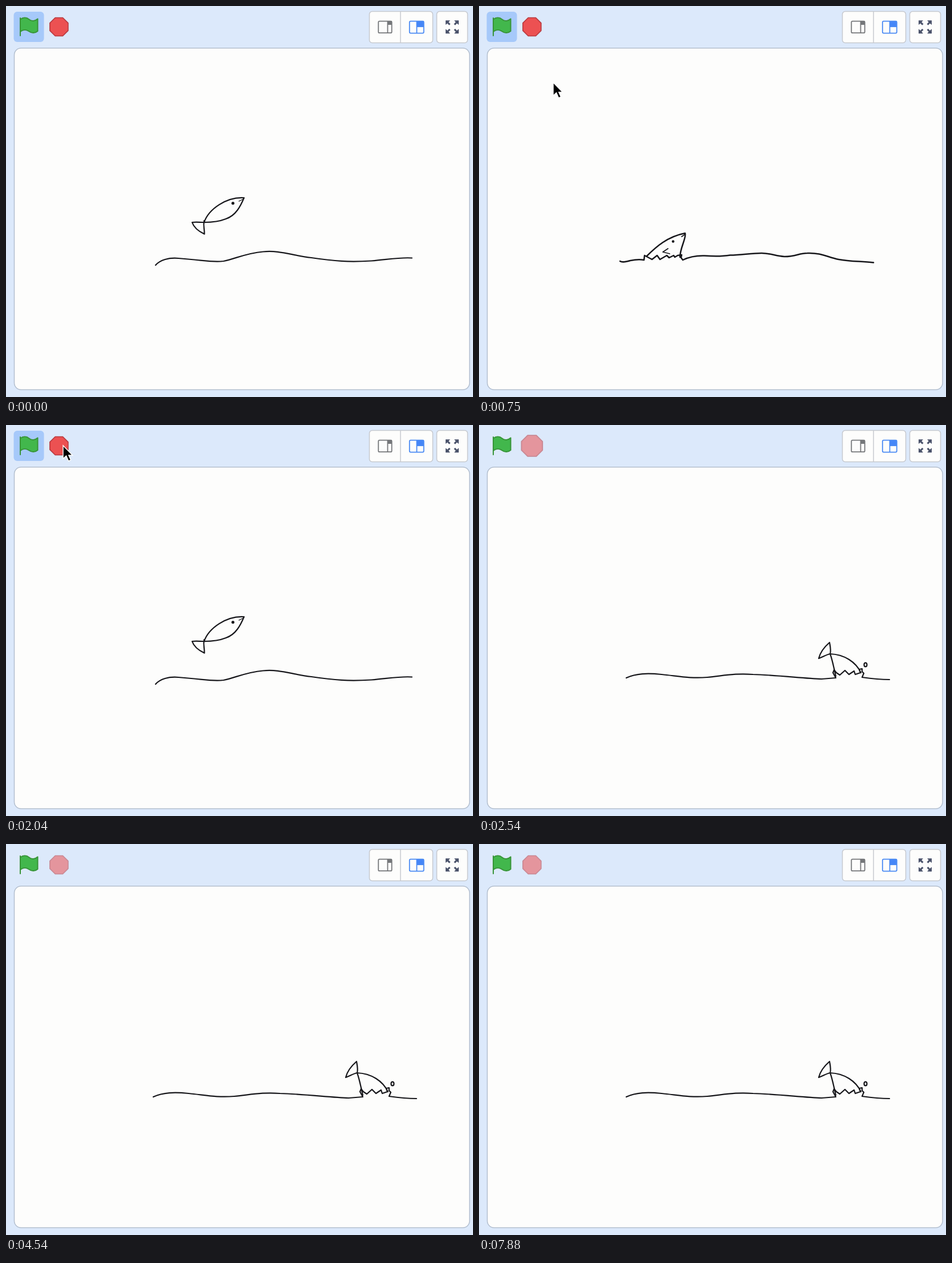
These frames come from a looping animation (818 by 685 pixels, 7.93 s). An HTML page:

```html
<!DOCTYPE html>
<html lang="en">
<head>
<meta charset="utf-8">
<title>Jumping fish</title>
<style>
html, body { margin: 0; width: 100%; height: 100%; overflow: hidden; background: #dce9fb; }
svg { display: block; width: 818px; height: 685px; }
.panel { fill: #fdfdfc; stroke: #c6c9cf; stroke-width: 1.5; }
.sketch { fill: none; stroke: #16161a; stroke-linecap: round; stroke-linejoin: round; }
.dot { fill: #16161a; stroke: none; }
</style>
</head>
<body>
<svg viewBox="0 0 818 685">
  <rect id="glow" x="13.5" y="10" width="53" height="53" rx="6" fill="#a6c9fa"/>
  <g fill="#42b74c" stroke="#389438" stroke-width="2" stroke-linejoin="round" stroke-linecap="round">
    <path d="M25 23.5C30 19.5 36 19.5 40.5 23.5S51 26.5 55.5 22.5V44C51 48 45 48 40.5 44.5S30 41 25 45Z"/>
    <path d="M25 21V52"/>
  </g>
  <path id="stop" d="M-6.6-16H6.6L16-6.6V6.6L6.6 16H-6.6L-16 6.6V-6.6Z" fill="#ec5152" stroke="#b8393f" stroke-width="1.6" stroke-linejoin="round"/>

  <rect class="panel" x="636.5" y="9.5" width="111" height="55" rx="5"/>
  <path class="panel" d="M691 10V64"/>
  <rect class="panel" x="754.5" y="9.5" width="54" height="55" rx="5"/>
  <g fill="none" stroke="#75777a" stroke-width="1.8">
    <rect x="652.3" y="26.6" width="23.4" height="20.6" rx="2"/>
    <path d="M668.5 27V47"/>
    <path d="M669 27H675V32H669Z" fill="#75777a"/>
  </g>
  <g fill="none" stroke="#4a8af4" stroke-width="1.8">
    <rect x="706.8" y="26.6" width="25" height="21" rx="2"/>
    <path d="M719.5 27V47"/>
    <path d="M720 27H731V36H720Z" fill="#4486f8"/>
  </g>
  <g id="corners" transform="translate(781.5 36.7)"></g>

  <rect x="14.5" y="73.7" width="797.5" height="598.5" rx="12" fill="#fdfdfc" stroke="#b3bfcf" stroke-width="1.5"/>

  <g id="leap" class="sketch" stroke-width="2.2">
    <path d="M262 454C270 445 285 440.500 302 442L330 444.500C350 446.500 365 449 381 447C400 443.500 420 433 450 430.500C480 427.500 500 437 535 441C575 447 600 449 640 446.500C670 444 690 440 711 441.500"/>
    <path d="M347 379C355 356 386 334 417 336C411 350 403 367 385 373C375 377 361 379 347 379"/>
    <path d="M347 379C340 379 333 378 326 379C329 388 338 395 347.500 399.500C348 391 345 386 347 376"/>
    <path d="M408 342L416 338" stroke-width="1.3"/>
    <circle class="dot" cx="397.500" cy="345.500" r="2.6"/>
  </g>

  <g id="rise" class="sketch" stroke-width="2.5">
    <path d="M247 447C251 450 258 448 265 446C275 444 283 444 289 445L290 437L303 444L312 437L317 444L329 437L333 441L341 437L343 440L348 437L355 436L354 441L357 445C367 440 378 437 395 437.500C415 439 425 439 440 436.500C460 436 478 433 495 433C510 433 520 438 535 439C555 439 560 433 575 433C600 432 610 440 630 444C650 448 670 447 691 449.500"/>
    <path d="M294 438C310 422 330 404 361 398C364 405 352 424 352 440"/>
    <path d="M331 425L322 431L334 434M355 404L361 400" stroke-width="1.8"/>
    <circle class="dot" cx="340" cy="412.500" r="2.3"/>
  </g>

  <g id="dive" class="sketch" stroke-width="2.2">
    <path d="M258 443C275 435 295 434.500 320 437C350 440 370 444.500 400 442C430 439 450 434.500 480 437C520 438 570 444 600 445L625 443L620 434L622 429L626 434L632 438L641 430L648 437L657 431L659 437L668 434L666 428L671 427V432L674 435L671 442C685 444 700 446 719 446"/>
    <path d="M614 381C607 387 598 397 595 409C603 406 609 402 615 401C617 395 615 387 614 381"/>
    <path d="M625 440C622 428 619 411 615 401C640 402 660 415 669 434"/>
    <ellipse cx="677" cy="420" rx="2.5" ry="3.4"/>
  </g>

  <path id="cursor" d="M0 0V23L5.500 18L9.500 27L13.500 25.300L9.700 17H16.500Z" fill="#000" stroke="#fff" stroke-width="1.4"/>
</svg>
<script>
const $ = id => document.getElementById(id);
const LOOP = 7930, CYCLE = 1000, STOPPED = 2500;
const poses = ['leap', 'dive', 'rise'];
// Cursor stops: time, x, y
const route = [[120, 40, 36], [600, 130, 134], [1300, 130, 134], [2000, 100, 36], [STOPPED, 100, 36]];

$('corners').innerHTML = [0, 90, 180, 270].map(a =>
  `<path transform="rotate(${a})" d="M3 -5.200L6.200 -8.400L3.600 -11.500H11.500V-3.600L8.400 -6.200L5.200 -3Z" fill="#4b536b"/>`).join('');

const clamp = v => Math.max(0, Math.min(1, v));
const show = (id, on) => $(id).style.display = on ? '' : 'none';

function cursorAt(t) {
  const i = Math.max(1, route.findIndex(p => p[0] > t));
  const [t0, x0, y0] = route[i - 1], [t1, x1, y1] = route[i];
  const u = clamp((t - t0) / (t1 - t0)), k = u * u * (3 - 2 * u);
  return [x0 + (x1 - x0) * k, y0 + (y1 - y0) * k];
}

function draw(now) {
  const t = now % LOOP, running = t < STOPPED;
  const phase = (Math.min(t, STOPPED) + 100) % CYCLE / CYCLE;
  const pose = poses[Math.floor(phase * poses.length)];
  poses.forEach(p => show(p, p === pose));

  show('glow', running);
  const hover = clamp((t - 2060) / 200) - clamp((t - 3200) / 130);
  $('stop').setAttribute('transform', `translate(92.8 36.500) scale(${1 + 0.15 * hover})`);
  $('stop').setAttribute('opacity', running ? 1 : 0.55);

  const visible = t >= route[0][0] && running;
  show('cursor', visible);
  if (visible) $('cursor').setAttribute('transform', `translate(${cursorAt(t)})`);
}

const start = performance.now();
function tick() {
  draw(performance.now() - start);
  requestAnimationFrame(tick);
}
tick();
</script>
</body>
</html>
```
